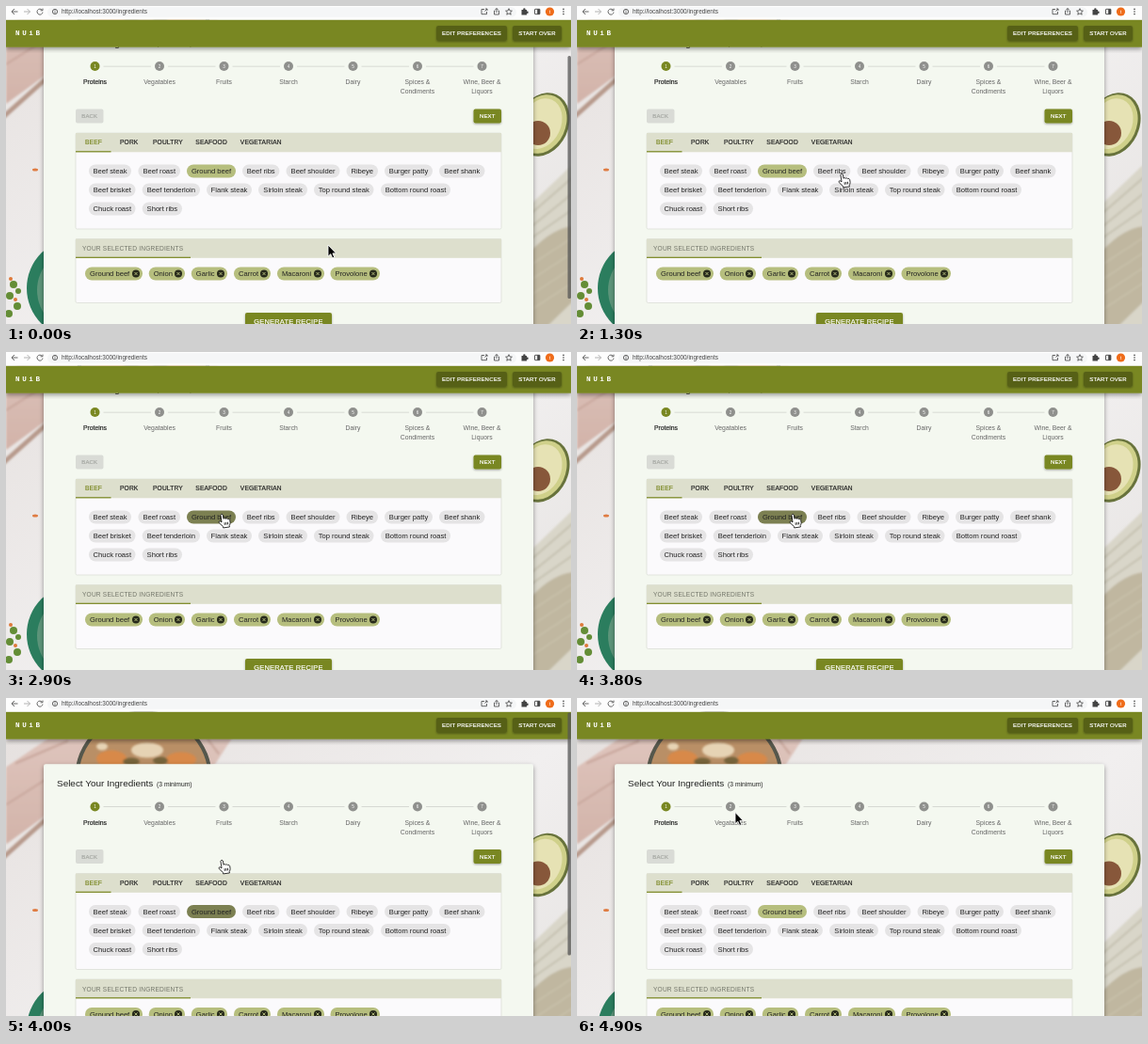
Animation, 600 px wide and 338 px high, one loop 5000 ms. Source, as an HTML page:

```html
<!DOCTYPE html>
<html lang="en">
<head>
<meta charset="utf-8">
<title>Ingredients</title>
<style>
html, body { margin: 0; width: 100%; height: 100%; overflow: hidden; background: #fff; }
svg { display: block; width: 600px; height: 338px; }
text { font-family: "Liberation Sans", Arial, sans-serif; }
.caps { letter-spacing: .0286em; }
.mid { text-anchor: middle; }
.bold { stroke: currentColor; stroke-width: .2px; }
.logo { font: bold 7.6px "Liberation Mono", monospace; letter-spacing: 2.6px; fill: #fff; }
</style>
</head>
<body>
<svg viewBox="0 0 600 338">
  <defs>
    <filter id="shade" x="-10%" y="-10%" width="120%" height="130%">
      <feDropShadow dx="0" dy="2" stdDeviation="2.6" flood-opacity=".4"/>
    </filter>
    <filter id="lift" x="-10%" y="-30%" width="120%" height="180%">
      <feDropShadow dx="0" dy="1" stdDeviation=".8" flood-opacity=".35"/>
    </filter>
    <filter id="soft"><feGaussianBlur stdDeviation="1"/></filter>
    <linearGradient id="marble" x2="1" y2="1">
      <stop stop-color="#e6e1df"/><stop offset=".5" stop-color="#f1efef"/><stop offset="1" stop-color="#e3e0de"/>
    </linearGradient>
    <linearGradient id="cloth" x2="0" y2="1">
      <stop stop-color="#dfc5bd"/><stop offset="1" stop-color="#d2b3a9"/>
    </linearGradient>
  </defs>

  <g id="page">
    <rect y="-10" width="600" height="410" fill="url(#marble)"/>
    <g filter="url(#soft)">
      <path d="M50-12H242L220 22 44 72 0 104V22Z" fill="url(#cloth)"/>
      <path d="M0 62 44 34M10 18 66-6M214-8 226 8" stroke="#cbaaa0" stroke-width="2.5"/>
      <path d="M-3 118 44 76" stroke="#b79a8c" stroke-width="5"/>
    </g>
    <circle cx="146" cy="35" r="71" fill="#b98f66" stroke="#55574c" stroke-width="4"/>
    <g filter="url(#soft)">
      <g fill="#d8894a"><ellipse cx="112" cy="13" rx="16" ry="9"/><ellipse cx="186" cy="14" rx="16" ry="8"/></g>
      <g fill="#e6d3b4"><ellipse cx="150" cy="4" rx="17" ry="8"/><ellipse cx="102" cy="0" rx="6" ry="4"/></g>
      <g fill="#76633a"><ellipse cx="133" cy="16" rx="9" ry="4"/><ellipse cx="164" cy="15" rx="8" ry="4"/></g>
    </g>
    <ellipse cx="31" cy="174" rx="3" ry="1.5" fill="#df7c42"/>
    <circle cx="75" cy="300" r="53" fill="#2b7d5e"/>
    <circle cx="78" cy="302" r="45" fill="#5d957a"/>
    <g fill="#648d36">
      <circle cx="8" cy="296" r="4"/><circle cx="13" cy="303" r="3"/><circle cx="4" cy="308" r="4"/>
      <circle cx="12" cy="319" r="4"/><circle cx="3" cy="327" r="4"/>
    </g>
    <g fill="#de7939"><circle cx="5" cy="290" r="2"/><circle cx="10" cy="312" r="2"/></g>
    <g filter="url(#soft)">
      <path d="M556 212 602 168V400H556Z" fill="#d9d6c9"/>
      <path d="M556 222 602 182M556 236 602 199M556 248 602 216" stroke="#c5c1b0" stroke-width="2"/>
      <path d="M556 262Q580 236 602 234V314L570 345H556Z" fill="#c0b7a0"/>
      <path d="M556 276 602 246M556 292 602 262M556 308 602 278M556 324 602 294" stroke="#cfc8b3"/>
    </g>
    <g transform="rotate(25 570 126)">
      <ellipse cx="570" cy="126" rx="27" ry="35" fill="#68733c"/>
      <ellipse cx="569" cy="126" rx="25" ry="32.5" fill="#cfd08a"/>
      <ellipse cx="568" cy="126" rx="21" ry="28" fill="#e6e2b4"/>
    </g>
    <circle cx="565" cy="135" r="13" fill="#87573a"/>
    <rect x="40" y="18.8" width="520" height="400" rx="2.5" fill="#f4f8f0" filter="url(#shade)"/>
    <g id="ui"></g>
  </g>

  <rect y="14.6" width="600" height="29.1" fill="#798721" filter="url(#shade)"/>
  <rect width="600" height="14.6" fill="#fdfdfd"/>
  <g id="bar"></g>
  <rect id="thumb" x="596.5" width="3.5" height="258" rx="1.5" fill="#555" opacity=".75"/>
  <g id="cursor">
    <path id="arrow" transform="scale(1.07)" d="M0 0V11.4L2.6 9 4.4 13 6.3 12.2 4.6 8.3H8Z" fill="#000" stroke="#fff" stroke-width=".8"/>
    <path id="hand" transform="rotate(-8)" fill="#fff" stroke="#111" stroke-width=".8" stroke-linejoin="round"
      d="M-1.2 1.2Q0-1 1.2 1.2V5.4Q2.7 4.3 3.6 5.8 5 5 5.8 6.5 7.4 6 7.7 7.8V10.6Q7.4 12.6 6.4 13.4V15H-.4V13.6L-4 9.2Q-4.6 7.2-2.8 7.4L-1.2 8.8ZM1.7 9.6V12.2M3.4 9.6V12.2M5.1 9.6V12.2"/>
  </g>
</svg>
<script>
const $ = id => document.getElementById(id);
const GREEN = '#798721', SOFT = '#b6be7e', DARK = '#7c8052';

const text = (x, y, size, str, fill = '#222', cls = '') =>
  `<text x="${x}" y="${y}" font-size="${size}" fill="${fill}" color="${fill}" class="${cls}">${str}</text>`;
const rect = (x, y, w, h, fill, rx = 0, more = '') =>
  `<rect x="${x}" y="${y}" width="${w}" height="${h}" rx="${rx}" fill="${fill}" ${more}/>`;
const button = (x, y, w, h, size, str, fill, ink = '#fff', lift = 'filter="url(#lift)"') =>
  rect(x, y, w, h, fill, 2, lift) + text(x + w / 2, y + h / 2 + size * .36, size, str, ink, 'caps mid bold');

function stepper() {
  const labels = ['Proteins', 'Vegatables', 'Fruits', 'Starch', 'Dairy', 'Spices &amp;|Condiments', 'Wine, Beer &amp;|Liquors'];
  return labels.map((label, i) => {
    const x = 94.5 + i * 68.5;
    const line = i < 6 ? rect(x + 9, 63.8, 50.5, .6, '#c3c5c0') : '';
    const lines = label.split('|').map((s, k) =>
      text(x, 83.3 + k * 10, 6.8, s, i ? '#666' : '#222', i ? 'mid' : 'mid bold'));
    return line + `<circle cx="${x}" cy="64" r="5" fill="${i ? '#8f908d' : GREEN}"/>` +
      text(x, 65.7, 4.6, i + 1, '#fff', 'mid') + lines.join('');
  }).join('');
}

function panel(y, h, tabW) {
  return rect(74, y, 452, h, '#fbfafc', 1.5, 'stroke="#d9dbd3" stroke-width=".7"') +
    rect(74, y, 452, 20.3, '#dddfcd') + rect(74, y + 19.2, tabW, 1.2, GREEN);
}

// each row: y, then name, left edge, right edge
const rows = [
  [175.5, 'Beef steak', 88, 133, 'Beef roast', 140.4, 185, 'Ground beef', 192, 244, 'Beef ribs', 251, 290.4,
    'Beef shoulder', 297.5, 354.5, 'Ribeye', 361.5, 395, 'Burger patty', 402, 453, 'Beef shank', 460, 508.5],
  [195.5, 'Beef brisket', 88, 137.5, 'Beef tenderloin', 144.7, 206, 'Flank steak', 213, 261, 'Sirloin steak', 268, 320,
    'Top round steak', 327, 390.5, 'Bottom round roast', 398, 472],
  [215.5, 'Chuck roast', 88, 137.5, 'Short ribs', 144.7, 187]
];
const picked = [284.5, 'Ground beef', 84, 145, 'Onion', 151.7, 190, 'Garlic', 196.8, 235, 'Carrot', 242, 281,
  'Macaroni', 288, 338, 'Provolone', 344.5, 397];

function chips([y, ...items], chosen) {
  let out = '';
  for (let i = 0; i < items.length; i += 3) {
    const [name, a, b] = items.slice(i, i + 3);
    const hot = !chosen && name === 'Ground beef';
    out += rect(a, y - 7, b - a, 14, chosen || hot ? SOFT : '#e5e4e5', 7, hot ? 'id="hot"' : '');
    if (!chosen) { out += text((a + b) / 2, y + 2.6, 7.6, name, '#222', 'mid'); continue; }
    const x = b - 7;
    out += text(a + 5, y + 2.6, 7.6, name) + `<circle cx="${x}" cy="${y}" r="4" fill="#26291a"/>` +
      `<path d="M${x - 1.6} ${y - 1.6}l3.2 3.2m0-3.2l-3.2 3.2" stroke="${SOFT}" stroke-width=".9"/>`;
  }
  return out;
}

const tabs = [['BEEF', 84], ['PORK', 121], ['POULTRY', 156], ['SEAFOOD', 201.3], ['VEGETARIAN', 248.8]];
$('ui').innerHTML =
  text(54, 42.6, 9.95, 'Select Your Ingredients') + text(160, 42, 6.75, '(3 minimum)') +
  stepper() +
  button(74, 109.5, 29.5, 15, 6, 'BACK', '#d9dbd6', '#a5a7a2', '') +
  button(496.5, 109.5, 29.5, 15, 6, 'NEXT', GREEN) +
  panel(135, 102, 37.5) +
  tabs.map(([s, x], i) => text(x, 147.4, 6.6, s, i ? '#222' : GREEN, 'caps bold')).join('') +
  rows.map(r => chips(r)).join('') +
  panel(247.5, 68, 122) + text(81, 260.3, 6.6, 'YOUR SELECTED INGREDIENTS', '#73766a', 'caps') +
  chips(picked, true) +
  button(254, 326, 92, 19.5, 7.45, 'GENERATE RECIPE', GREEN);

const stroke = (d, color = '#555') => `<path d="${d}" fill="none" stroke="${color}" stroke-width=".9"/>`;
$('bar').innerHTML =
  rect(44, 1.2, 498, 10.6, '#f5f6f7', 5.3) +
  stroke('M12.5 6H6M9 3 6 6 9 9') + stroke('M19 6H25.5M22.5 3 25.5 6 22.5 9', '#aaa') +
  stroke('M38.3 4.2A3 3 0 1 0 39 6.6M39 2.6V4.8H36.6') +
  stroke('M49.4 6a2.6 2.6 0 1 0 5.2 0a2.6 2.6 0 1 0-5.2 0M52 5.6V7.6M52 4.2V4.9') +
  text(59, 8.3, 6.45, 'http://localhost:3000/ingredients', '#444') +
  stroke('M508 3.5H505V8.7H510.5V6M508.5 5.5 511 3M509 3H511V5') +
  stroke('M519.5 5H518.5V9H523.5V5H522.5M521 7V2.5M519.5 4 521 2.5 522.5 4') +
  stroke('M534 2.7 535 5 537.4 5.2 535.6 6.8 536.2 9.2 534 7.9 531.8 9.2 532.4 6.8 530.6 5.2 533 5Z') +
  '<path d="M547.5 4H549.3a1.2 1.2 0 1 1 2.2 0H553V5.6a1.2 1.2 0 1 1 0 2.2V9.4H547.5Z" fill="#444"/>' +
  rect(561.5, 3.3, 5.4, 5.4, 'none', .5, 'stroke="#444" stroke-width=".9"') + rect(564.2, 3.3, 2.7, 5.4, '#444') +
  '<circle cx="577.5" cy="6" r="4.6" fill="#ef6c1a"/>' + text(577.5, 8, 5.5, 't', '#fff', 'mid') +
  [3.4, 6, 8.6].map(y => `<circle cx="592" cy="${y}" r=".8" fill="#444"/>`).join('') +
  '<text x="10" y="31.4" class="logo">NUiB</text>' +
  button(457, 21, 75, 16, 6, 'EDIT PREFERENCES', '#566019') +
  button(538, 21, 52, 16, 6, 'START OVER', '#566019');

// pointer path: time, x, y
const path = [[0, 342, 254], [300, 342, 254], [1200, 281, 178], [1500, 281, 178], [2000, 274, 170],
  [2200, 274, 170], [2800, 229, 172], [4100, 229, 172], [4800, 168, 121.5], [5000, 168, 121.5]];

function pointer(t) {
  const i = path.findIndex(k => k[0] > t);
  const [t0, x0, y0] = path[i - 1], [t1, x1, y1] = path[i];
  const u = (t - t0) / (t1 - t0), e = u * u * (3 - 2 * u);
  return [x0 + (x1 - x0) * e, y0 + (y1 - y0) * e];
}

function draw(now) {
  const t = Math.floor(now % 5000 / 100) * 100;
  const [x, y] = pointer(t);
  const up = Math.min(1, Math.max(0, (t - 3800) / 200));
  const settled = t < 4200;
  const hand = y < 203 && settled;
  $('page').setAttribute('transform', `translate(0 ${51.5 * up})`);
  $('hot').setAttribute('fill', x < 244 && settled ? DARK : SOFT);
  $('cursor').setAttribute('transform', `translate(${x} ${y})`);
  $('hand').style.display = hand ? '' : 'none';
  $('arrow').style.display = hand ? 'none' : '';
  $('thumb').setAttribute('y', 53 - 37.5 * up);
  $('thumb').style.display = t < 600 || t > 3800 && t < 4800 ? '' : 'none';
}

const start = performance.now();
function tick() {
  draw(performance.now() - start);
  requestAnimationFrame(tick);
}
tick();
</script>
</body>
</html>
```
